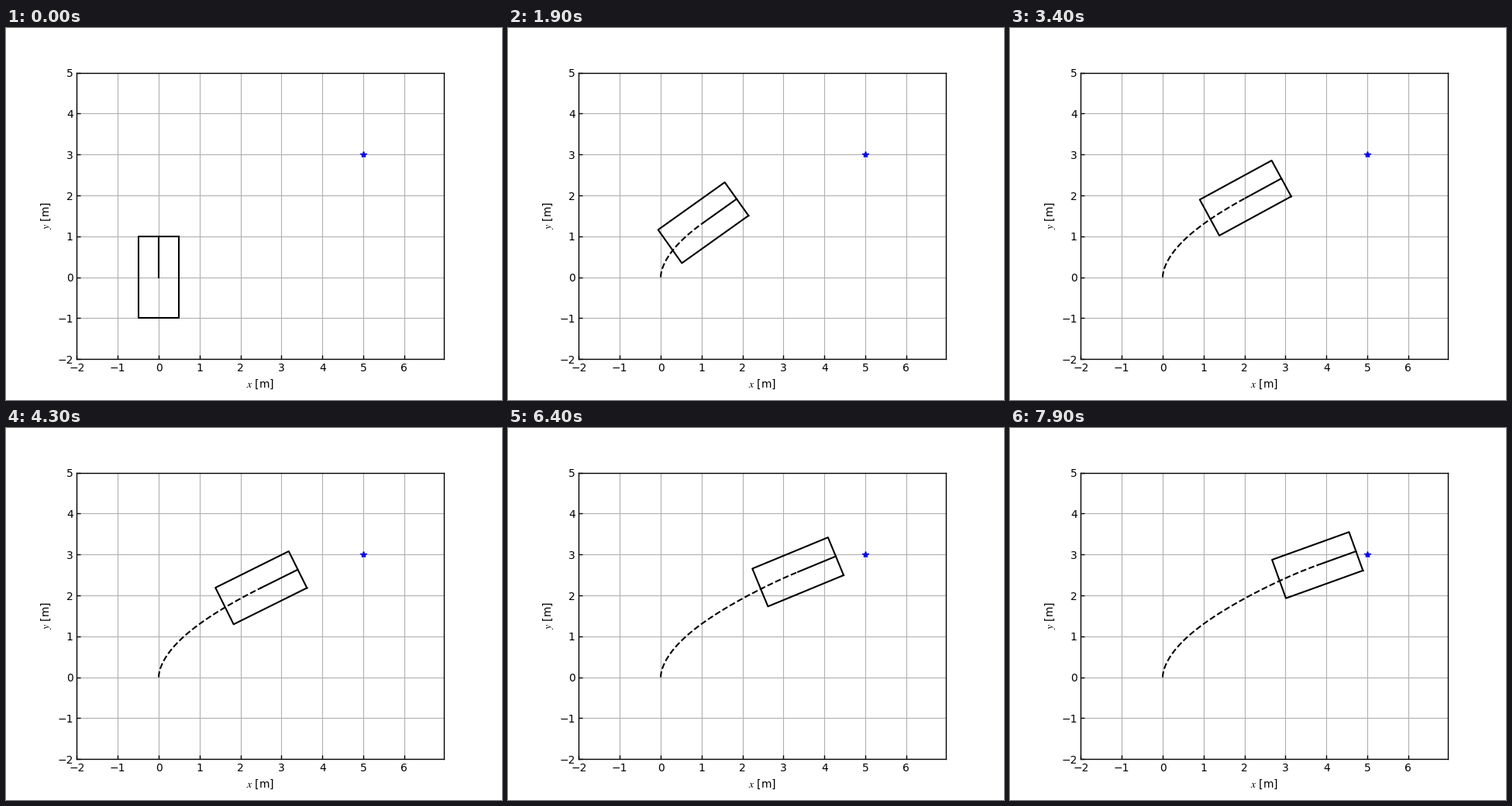
These frames come from a looping animation (640x480 px, 8000 ms). A matplotlib script:

```python
import numpy as np
import matplotlib.pyplot as plt
from matplotlib.animation import FuncAnimation

plt.rcParams.update({
    "font.family": "DejaVu Sans",
    "mathtext.fontset": "stix",
    "axes.linewidth": 1.0,
    "xtick.direction": "in",
    "ytick.direction": "in",
    "xtick.major.width": 1.0,
    "ytick.major.width": 1.0,
})

FRAMES, INTERVAL = 80, 100
DT = INTERVAL / 1000
GOAL, GOAL_HEADING = (5, 3), -np.pi / 2
GAMMA, K, H = 0.209, 1.16, 0.418     # gains of the steering law
LENGTH, WIDTH = 2, 1


def control(pose):
    """Speed and turn rate that steer the unicycle to the goal."""
    x, y, heading = pose
    dx, dy = GOAL[0] - x, GOAL[1] - y
    bearing = np.arctan2(dy, dx)
    alpha = bearing - heading
    theta = bearing - GOAL_HEADING
    v = GAMMA * np.hypot(dx, dy) * np.cos(alpha)
    ratio = np.cos(alpha) * np.sinc(alpha / np.pi)
    omega = K * alpha + GAMMA * ratio * (alpha + H * theta)
    return v, omega


def simulate():
    """Hold the control over each time step and move along its arc."""
    pose = np.array([0, 0, np.pi / 2])
    poses = [pose]
    for _ in range(FRAMES - 1):
        v, omega = control(pose)
        mid = pose[2] + omega * DT / 2
        pose = pose + DT * np.array([v * np.cos(mid), v * np.sin(mid), omega])
        poses.append(pose)
    return np.array(poses)


def place(points, pose):
    """Rotate and shift body points into the world."""
    c, s = np.cos(pose[2]), np.sin(pose[2])
    return np.array([[c, -s], [s, c]]) @ points + pose[:2, None]


poses = simulate()
a, b = LENGTH / 2, WIDTH / 2
body = np.array([[a, a, -a, -a, a], [-b, b, b, -b, -b]])
nose = np.array([[0, a], [0, 0]])

fig, ax = plt.subplots(figsize=(6.4, 4.8), dpi=100)
ax.set_aspect("equal")
ax.set_xlim(-2, 6.96)
ax.set_ylim(-2, 5)
ax.set_xticks(range(-2, 7))
ax.set_yticks(range(-2, 6))
ax.set_xlabel("$x$ [m]")
ax.set_ylabel("$y$ [m]")
ax.grid(True)

ax.plot(*GOAL, "b*")
trail, = ax.plot([], [], "k--")
outline, = ax.plot([], [], "k")
pointer, = ax.plot([], [], "k")


def draw(i):
    trail.set_data(poses[:i + 1, 0], poses[:i + 1, 1])
    outline.set_data(*place(body, poses[i]))
    pointer.set_data(*place(nose, poses[i]))
    return trail, outline, pointer


anim = FuncAnimation(fig, draw, frames=FRAMES, interval=INTERVAL,
                     repeat=True, repeat_delay=0)
plt.show()
```
